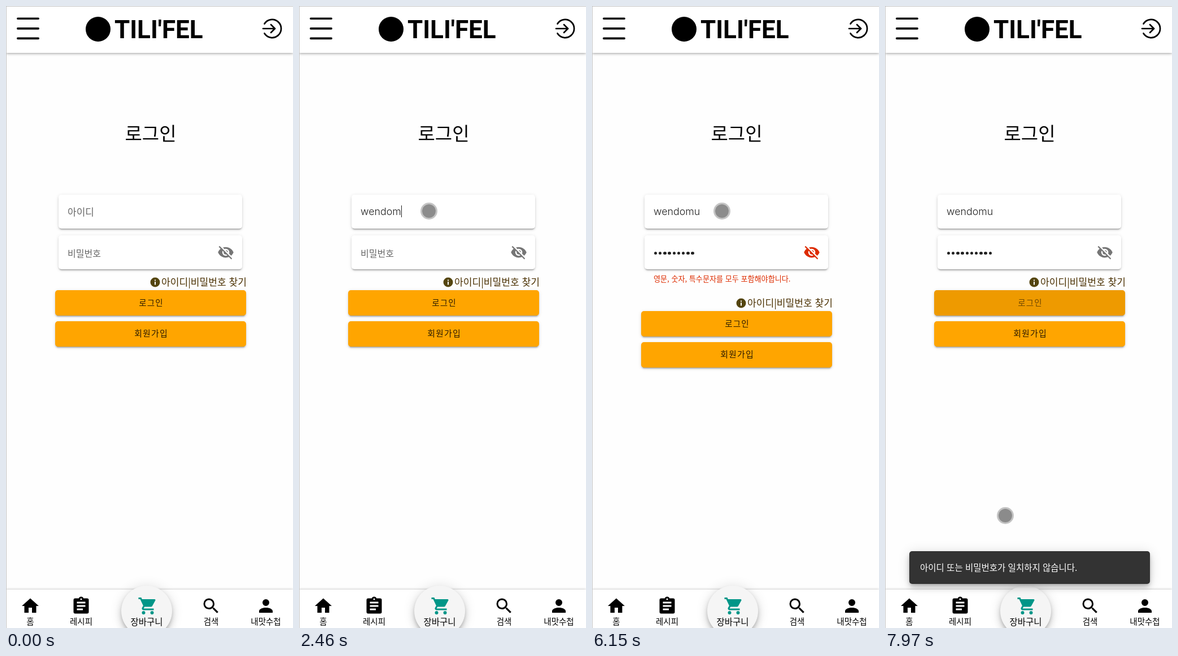
Recreate the animation shown at these times as an HTML page. Size 508 by 1101 pixels, loop 8000 ms.

```html
<!DOCTYPE html>
<html lang="ko">
<head>
<meta charset="utf-8">
<title>로그인</title>
<style>
  html, body { margin: 0; width: 100%; height: 100%; overflow: hidden; background: #fefefe; }
  body { position: relative; font-family: "Noto Sans CJK KR", "Noto Sans CJK", sans-serif; font-weight: 300; color: #000; }
  #stage { position: absolute; left: 0; top: 0; width: 508px; height: 1101px; overflow: hidden; }
  #stage * { position: absolute; box-sizing: border-box; }
  #stage path, #stage span { position: static; }
  .layer { left: 0; top: 0; width: 508px; height: 0; }
  p { margin: 0; left: calc(var(--x) * 1px); top: calc(var(--y) * 1px); font-size: calc(var(--s) * 1px);
      line-height: 0; white-space: pre; }
  .mid { transform: translateX(-50%); }
  .label { color: #666; }
  .error { color: #dd2c00; }
  header { left: 0; top: 0; width: 508px; height: 83px; background: #fff; box-shadow: 0 1px 5px rgba(0,0,0,.4); }
  .field, .button { border-radius: 5px;
    box-shadow: 0 3.75px 1.25px -2.5px rgba(0,0,0,.2), 0 2.5px 2.5px rgba(0,0,0,.14), 0 1.25px 6.25px rgba(0,0,0,.12); }
  .field { left: 93px; width: 325px; height: 60px; background: #fff; }
  .button { left: 87px; width: 338px; height: 45px; background: #ffa500; overflow: hidden; }
  .button p { letter-spacing: 1.1px; font-weight: 400; color: #2c1c00; }
  #user { font-family: Inter, sans-serif; color: #222; }
  #hover { inset: 0; background: #000; }
  #ripple { left: -1px; top: -147.5px; width: 340px; height: 340px; border-radius: 50%; background: #000; }
  .dot { top: 434.5px; width: 5.4px; height: 5.4px; border-radius: 50%; background: #222; }
  #caret { left: 0; top: 0; width: 1px; height: 21px; background: #222; }
  nav { left: 0; top: 1033px; width: 508px; height: 68px; background: #fff; box-shadow: 0 0 4px rgba(0,0,0,.3); }
  .hub { left: 204px; top: 1026px; width: 90px; height: 90px; border-radius: 50%; background: #f5f5f5; }
  .hub, #snack { box-shadow: 0 3.75px 6.25px -1.25px rgba(0,0,0,.2), 0 7.5px 12.5px rgba(0,0,0,.14), 0 1.25px 22.5px rgba(0,0,0,.12); }
  #snack { left: 43px; top: 965px; width: 426px; height: 58px; border-radius: 5px; background: #333; color: #fff; }
  #snack p { font-weight: 400; }
  #pointer { left: -15px; top: -15px; width: 30px; height: 30px; border-radius: 50%;
    background: rgba(0,0,0,.45); background-clip: padding-box; border: 3px solid rgba(0,0,0,.23); }
  .edge { left: 0; top: 0; width: 508px; height: 1101px; border: solid #c4c4c4; border-width: 1px 0 0 1px; }
</style>
</head>
<body>
<div id="stage">
  <header>
    <i style="left:141px;top:19px;width:44px;height:44px;border-radius:50%;background:#000"></i>
    <svg width="508" height="83" style="left:0;top:0">
      <text x="192" y="57" font-family="Roboto, sans-serif" font-weight="700" font-size="44">TILI'FEL</text>
      <g fill="none" stroke="#000" stroke-linecap="round">
        <path d="M20.8 22.2H57.2M20.8 39.9H57.2M20.8 57.4H57.2" stroke-width="3.6"/>
        <path d="M457.5 31.5A16 16 0 1 1 457.5 48.5M455 40H476M469 33L476 40L469 47" stroke-width="2.7"/>
      </g>
    </svg>
  </header>

  <p class="mid" style="--x:256;--y:224;--s:33">로그인</p>

  <i class="field" style="top:334px"></i>
  <p class="label" id="userLabel" style="--x:109;--y:364;--s:17">아이디</p>
  <p id="user" style="--x:109;--y:364;--s:17.8"></p>
  <p class="error" id="userError" style="--x:109;--y:410;--s:13.1">5자 이상으로 이루어져야 합니다.</p>

  <div class="layer" id="secret">
    <i class="field" style="top:406px"></i>
    <p class="label" id="secretLabel" style="--x:109;--y:437;--s:16">비밀번호</p>
    <svg id="eye" viewBox="0 0 24 24" width="30" height="30" style="left:374px;top:421px">
      <path fill="currentColor" d="M11.83,9L15,12.16C15,12.11 15,12.05 15,12A3,3 0 0,0 12,9C11.94,9 11.89,9 11.83,9M7.53,9.8L9.08,11.35C9.03,11.56 9,11.77 9,12A3,3 0 0,0 12,15C12.22,15 12.44,14.97 12.65,14.92L14.2,16.47C13.53,16.8 12.79,17 12,17A5,5 0 0,1 7,12C7,11.21 7.2,10.47 7.53,9.8M2,4.27L4.28,6.55L4.73,7C3.08,8.3 1.78,10 1,12C2.73,16.39 7,19.5 12,19.5C13.55,19.5 15.03,19.2 16.38,18.66L16.81,19.08L19.73,22L21,20.73L3.27,3M12,7A5,5 0 0,1 17,12C17,12.64 16.87,13.26 16.64,13.82L19.57,16.75C21.07,15.5 22.27,13.86 23,12C21.27,7.61 17,4.5 12,4.5C10.6,4.5 9.26,4.75 8,5.2L10.17,7.35C10.74,7.13 11.35,7 12,7Z"/>
    </svg>
  </div>
  <p class="error" id="shortError" style="--x:109;--y:482.5;--s:13.1">8자 이상이어야합니다.</p>
  <p class="error" id="mixError" style="--x:109;--y:482.5;--s:13.1">영문, 숫자, 특수문자를 모두 포함해야합니다.</p>

  <div class="layer" id="actions">
    <svg width="20" height="20" viewBox="-10 -10 20 20" style="left:254px;top:479px">
      <path fill="#54450f" d="M0-8.5A8.5 8.5 0 1 1 0 8.5A8.5 8.5 0 1 1 0-8.5"/>
      <path fill="#fff" d="M-1-4.6H1V-2.6H-1ZM-1-1H1V4.5H-1Z"/>
    </svg>
    <p style="--x:275;--y:488;--s:17.1;color:#4a3000">아이디|비밀번호 찾기</p>
    <div class="button" style="top:503px">
      <i id="hover"></i><i id="ripple"></i>
      <p class="mid" id="submitText" style="--x:170;--y:21.5;--s:14.5">로그인</p>
    </div>
    <div class="button" style="top:558px">
      <p class="mid" style="--x:170;--y:21;--s:15">회원가입</p>
    </div>
  </div>
  <i id="caret"></i>

  <nav></nav>
  <div class="hub"></div>
  <div id="tabs"></div>

  <div id="snack"><p style="--x:19;--y:28;--s:15.5">아이디 또는 비밀번호가 일치하지 않습니다.</p></div>
  <i id="pointer"></i>
  <i class="edge"></i>
</div>

<script>
const LOOP = 8000, SHIFT = '0 37px', REST = '0 0';
const $ = id => document.getElementById(id);
const start = document.timeline.currentTime || 0;

// rows: [time, value, easing towards the next row]; a row without easing holds its value
function track(el, prop, rows) {
  const frames = rows.map(([time, value, easing = 'step-end']) =>
    ({ offset: time / LOOP, [prop]: value, easing }));
  frames.push({ offset: 1, [prop]: rows[rows.length - 1][1] });
  el.animate(frames, { duration: LOOP, iterations: Infinity }).startTime = start;
}
const show = (el, from, to = LOOP) =>
  track(el, 'opacity', [[0, 0], [from, 1], ...(to < LOOP ? [[to, 0]] : [])]);
const at = (x, y) => `${x}px ${y}px`;

// Bottom navigation: label centre, label, size, icon, icon centre
const tabs = [
  [43, '홈', 14.5, 'M10,20V14H14V20H19V12H22L12,3L2,12H5V20H10Z'],
  [133, '레시피', 14.5, 'M17,9H7V7H17M17,13H7V11H17M14,17H7V15H14M12,3A1,1 0 0,1 13,4A1,1 0 0,1 12,5A1,1 0 0,1 11,4A1,1 0 0,1 12,3M19,3H14.82C14.4,1.84 13.3,1 12,1C10.7,1 9.6,1.84 9.18,3H5A2,2 0 0,0 3,5V19A2,2 0 0,0 5,21H19A2,2 0 0,0 21,19V5A2,2 0 0,0 19,3Z'],
  [249, '장바구니', 15.5, 'M17,18A2,2 0 0,1 19,20A2,2 0 0,1 17,22A2,2 0 0,1 17,18M1,2H4.27L5.21,4H20A1,1 0 0,1 20.88,5.5L17.3,11.97C16.96,12.58 16.3,13 15.55,13H8.1L7.2,14.63A.25,.25 0 0,0 7.42,15H19V17H7C5.89,17 5,16.1 5,15C5,14.65 5.09,14.32 5.24,14.04L6.6,11.59L3,4H1M7,18A2,2 0 0,1 9,20A2,2 0 0,1 7,22A2,2 0 0,1 7,18Z', 250.5],
  [363, '검색', 14.5, 'M9.5,3A6.5,6.5 0 0,1 16,9.5C16,11.11 15.41,12.59 14.44,13.73L14.71,14H15.5L20.5,19L19,20.5L14,15.5V14.71L13.73,14.44C12.59,15.41 11.11,16 9.5,16A6.5,6.5 0 0,1 9.5,3M9.5,5C7,5 5,7 5,9.5C5,12 7,14 9.5,14C12,14 14,12 14,9.5C14,7 12,5 9.5,5Z'],
  [460, '내맛수첩', 14.5, 'M12,4A4,4 0 0,1 12,12A4,4 0 0,1 12,4M12,14C16.42,14 20,15.79 20,18V20H4V18C4,15.79 7.58,14 12,14Z'],
];
$('tabs').innerHTML = tabs.map(([x, name, size, path, iconX = x]) => `
  <svg viewBox="0 0 24 24" width="36" height="36" style="left:${iconX - 18}px;top:1044px">
    <path d="${path}" fill="${x === 249 ? '#009688' : '#000'}"/></svg>
  <p class="mid" style="--x:${x};--y:1089;--s:${size}">${name}</p>`).join('');

// Typing
const userTimes = [1870, 1980, 2090, 2200, 2330, 2460, 2530];
const secretTimes = [3410, 3640, 3820, 4080, 4190, 4300, 4410, 5540, 5690, 6260];
const caretRows = [[0, at(109, 353)]];

$('user').innerHTML = [...'wendomu'].map(c => `<span>${c}</span>`).join('');
[...$('user').children].forEach((letter, i) => {
  show(letter, userTimes[i]);
  caretRows.push([userTimes[i], at(109 + letter.offsetLeft + letter.offsetWidth, 353)]);
});
caretRows.push([2930, at(109, 426)]);
secretTimes.forEach((time, i) => {
  const dot = document.createElement('i');
  dot.className = 'dot';
  dot.style.left = 109.8 + 8.2 * i + 'px';
  $('secret').append(dot);
  show(dot, time);
  caretRows.push([time, at(108.6 + 8.15 * (i + 1), 426)]);
});
track($('caret'), 'translate', caretRows);
track($('caret'), 'opacity', [[0, 0], [1010, 1], [1540, 0], [1870, 1], [4940, 0], [5420, 1],
  [6150, 0], [6260, 1], [6790, 0], [7320, 1], [7440, 0]]);

// Labels, messages and the room they take
const userValid = userTimes[4], secretLong = secretTimes[7], secretValid = secretTimes[9];
track($('userLabel'), 'opacity', [[0, 1], [userTimes[0], 0]]);
track($('secretLabel'), 'opacity', [[0, 1], [secretTimes[0], 0]]);
show($('userError'), userTimes[0], userValid);
show($('shortError'), secretTimes[0], secretLong);
show($('mixError'), secretLong, secretValid);
track($('secret'), 'translate', [[0, REST], [userTimes[0], SHIFT], [userValid, REST]]);
track($('actions'), 'translate', [[0, REST], [userTimes[0], SHIFT], [userValid, REST],
  [secretTimes[0], SHIFT], [secretValid, REST]]);

const swing = 'cubic-bezier(.25,.8,.5,1)', decel = 'cubic-bezier(0,0,.2,1)';
const gray = '#757575', blue = '#1976d2', red = '#dd2c00';
track($('eye'), 'color', [[0, gray], [2930, gray, swing], [3210, blue], [3410, blue, swing], [3710, red],
  [6260, red, swing], [6560, blue], [7410, blue, swing], [7710, gray]]);

// Pointer, button and notice
show($('pointer'), 190);
track($('pointer'), 'translate', [[0, at(17, 965)], [190, at(17, 965), 'ease-in-out'], [750, at(236, 368)],
  [990, at(236, 368), 'ease-out'], [1190, at(230, 363)], [6740, at(230, 363), 'ease-in-out'],
  [7300, at(263, 525)], [7570, at(263, 525), 'ease-in-out'], [7970, at(213, 902)]]);
track($('hover'), 'opacity', [[0, 0], [7200, 0, 'linear'], [7300, .04], [7570, .04, 'linear'], [7800, .068]]);
track($('ripple'), 'translate', [[0, '7px 0'], [7467, '7px 0', decel], [7717, '0 0']]);
track($('ripple'), 'scale', [[0, '.3'], [7467, '.3', decel], [7717, '1']]);
track($('ripple'), 'opacity', [[0, 0], [7467, 0, 'linear'], [7500, .21], [7690, .21, 'ease'], [7960, 0]]);
track($('submitText'), 'opacity', [[0, 1], [7690, 1, 'linear'], [7900, .65]]);
track($('snack'), 'opacity', [[0, 0], [7493, 0, decel], [7643, 1]]);
track($('snack'), 'scale', [[0, '.8'], [7493, '.8', decel], [7643, '1']]);
</script>
</body>
</html>
```
